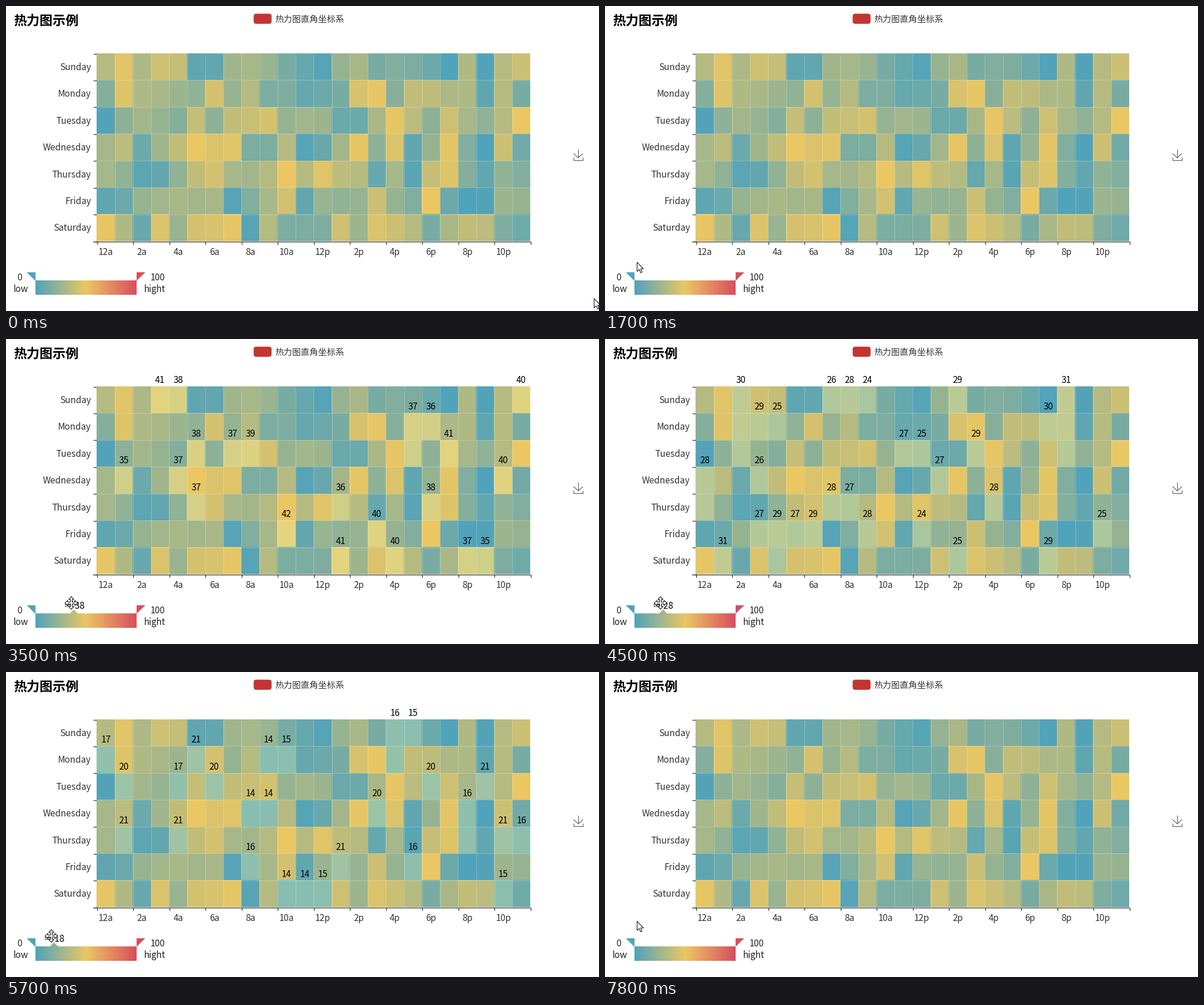
A matplotlib script for the animation above (8000 ms loop, 1026x528 px).

```python
import numpy as np
import matplotlib
matplotlib.rcParams["toolbar"] = "None"
import matplotlib.pyplot as plt
from matplotlib.animation import FuncAnimation
from matplotlib.patches import FancyBboxPatch, Polygon

W, H, DPI, STEP, FRAMES = 1026, 528, 100, 100, 80
PT = 72 / DPI
FONT = "Noto Sans CJK JP"
DARK = "#333333"
RAMP = np.array([(80, 163, 186), (234, 199, 99), (217, 78, 93)], float)

# One value per hour
sunday = [33, 47, 30, 41, 38, 5, 6, 26, 28, 24, 13, 7,
          2, 23, 29, 13, 16, 15, 9, 0, 31, 1, 33, 40]
monday = [17, 46, 31, 29, 25, 21, 43, 23, 33, 14, 15, 7,
          9, 13, 44, 49, 18, 37, 36, 30, 31, 5, 33, 13]
tuesday = [1, 20, 27, 23, 17, 38, 20, 37, 39, 43, 23, 27,
           25, 9, 9, 29, 49, 35, 20, 41, 28, 21, 33, 50]
wednesday = [28, 35, 9, 26, 37, 50, 45, 47, 14, 14, 33, 2,
             8, 27, 49, 20, 45, 5, 23, 48, 16, 0, 40, 11]
thursday = [28, 21, 4, 6, 21, 37, 43, 28, 27, 33, 50, 33,
            47, 36, 33, 7, 28, 3, 38, 46, 17, 6, 21, 16]
friday = [5, 9, 23, 27, 29, 27, 29, 2, 16, 28, 42, 6,
          24, 21, 23, 40, 23, 16, 50, 9, 0, 1, 25, 23]
saturday = [49, 31, 8, 45, 24, 43, 44, 49, 2, 33, 14, 14,
            15, 41, 25, 45, 40, 33, 13, 29, 37, 35, 15, 10]
DAYS = ["Sunday", "Monday", "Tuesday", "Wednesday", "Thursday", "Friday", "Saturday"]
values = np.array([sunday, monday, tuesday, wednesday, thursday, friday, saturday])

LEFT, TOP, RIGHT, BOTTOM = 157.3, 82, 907.3, 407
CW, CH = (RIGHT - LEFT) / 24, (BOTTOM - TOP) / 7
BAR_X, BAR_W, BAR_Y, BAR_H = 51, 175, 475.5, 25
REACH = 600 / 140

# Pointer path: time in ms, x, y
PATH = np.array([
    (800, 122, 516), (1000, 110, 494), (1200, 85, 482), (1400, 62, 472),
    (1600, 56, 452), (1700, 55, 443), (1800, 56, 455), (1900, 58, 466),
    (2200, 86, 482), (2500, 130, 489), (2600, 128, 474), (2700, 126, 457),
    (3300, 126, 457), (3400, 120, 457), (3500, 113, 457), (3700, 109, 457),
    (4000, 109, 457), (4500, 96, 457), (4800, 89, 457), (5000, 89, 457),
    (5300, 84, 457), (5400, 84, 457), (5700, 78.5, 457), (6000, 69, 457),
    (6300, 69, 457), (6400, 66, 457), (6500, 66, 457), (6600, 64, 455),
    (6700, 62, 443), (7100, 43, 431), (7400, 43, 431), (7800, 55, 431)])


def ramp(v):
    """Colour of a value on the 0-100 scale."""
    v = np.clip(np.asarray(v, float), 0, 100)
    return np.stack([np.interp(v, (0, 50, 100), RAMP[:, i]) for i in range(3)], -1) / 255


fig = plt.figure(figsize=(W / DPI, H / DPI), dpi=DPI, facecolor="white")
ax = fig.add_axes([0, 0, 1, 1])
ax.set_xlim(0, W)
ax.set_ylim(H, 0)
ax.axis("off")


def label(x, y, s, size=15.4, ha="center", color=DARK, **kw):
    return ax.text(x, y, s, fontsize=size * PT, ha=ha, va="baseline",
                   color=color, family=FONT, **kw)


def line(xs, ys, color=DARK, width=1.25, **kw):
    ax.plot(xs, ys, color=color, lw=width * PT, **kw)


def shape(points, fill, edge="none", z=3):
    return ax.add_patch(Polygon(points, fc=fill, ec=edge, lw=PT, zorder=z))


def image(data, box):
    x0, y0, x1, y1 = box
    return ax.imshow(data, extent=(x0, x1, y1, y0), aspect="auto",
                     interpolation="nearest", zorder=2)


# Title, legend, download button
label(13, 33, "热力图示例", 22.5, "left", "black", weight="bold")
ax.add_patch(FancyBboxPatch((428.5, 13.3), 31, 17.5, fc="#c23531", ec="none",
                            boxstyle="round,pad=0,rounding_size=4.4"))
label(465.5, 28, "热力图直角坐标系", 15, "left")
grey = dict(color="#666666", solid_capstyle="butt", solid_joinstyle="miter")
line([982, 990, 998.2], [255.4, 262.7, 255.6], **grey)
line([982, 982, 998, 998], [262, 266.6, 266.6, 262], **grey)
line([990, 990], [248, 262.5], **grey)

# Axes
line([157, 157], [TOP, 407.5], zorder=1, solid_capstyle="butt")
line([151, RIGHT], [407.5, 407.5], zorder=4)
for i in range(8):
    y = TOP + i * CH + 0.5
    line([151, 157], [y, y], zorder=1, solid_capstyle="butt")
for i in range(13):
    x = LEFT + i * 2 * CW + 0.2
    line([x, x], [407.5, 413], solid_capstyle="butt")
for i, name in enumerate(DAYS):
    label(147, TOP + (i + 0.5) * CH + 5.6, name, ha="right")
for h in range(0, 24, 2):
    label(LEFT + (h + 0.5) * CW, 431, f"{h % 12 or 12}{'ap'[h // 12]}")

# Heat map
base = ramp(values)
lifted = np.minimum(base * 1.1, 1)
cells = image(base, (LEFT, TOP, RIGHT, BOTTOM))
for c in range(1, 24):
    x = LEFT + c * CW
    line([x, x], [TOP, BOTTOM], "white", 1, alpha=0.25, zorder=3)
for r in range(1, 7):
    y = TOP + r * CH
    line([LEFT, RIGHT], [y, y], "white", 1, alpha=0.25, zorder=3)
numbers = [[label(LEFT + (c + 0.5) * CW, TOP + r * CH - 6, str(values[r, c]),
                  color="black", zorder=5, visible=False)
            for c in range(24)] for r in range(7)]

# Colour scale
image(ramp(np.linspace(0, 100, BAR_W))[None], (BAR_X, BAR_Y, BAR_X + BAR_W, BAR_Y + BAR_H))
shape([(36, 461), (51, 461), (51, 475.5)], ramp(0))
shape([(226, 461), (241, 461), (226, 475.5)], ramp(100))
for x, y, s in ((24, 475, "0"), (26, 495, "low"), (262, 475, "100"), (257.5, 495, "hight")):
    label(x, y, s, color="#222222")
marker = shape([(0, 0), (1, 0), (0, 1)], "white", z=5)
readout = label(0, 467, "", color="black", zorder=6)

# Pointers
ARROW = np.array([(0.5, 0.5), (0.5, 16.5), (4.2, 13), (6.8, 18.8), (9.2, 17.7),
                  (6.7, 12), (11.5, 12)])
quarter = np.array([(1.5, -1.5), (1.5, -6), (4.5, -6), (0, -11), (-4.5, -6), (-1.5, -6)])
MOVE = np.vstack([quarter @ np.array([[np.cos(a), np.sin(a)], [-np.sin(a), np.cos(a)]])
                  for a in -np.arange(4) * np.pi / 2])
pointer = shape(ARROW, "white", "black", z=8)


def hovering(t):
    return 1000 <= t <= 1500 or 1900 <= t <= 6800


def draw(n):
    t = n * STEP
    if t < 100:
        x, y = 1017, 506
    else:
        x, y = (np.interp(t, PATH[:, 0], PATH[:, i]) for i in (1, 2))
    on = hovering(t)
    move = on and t < 6700
    pointer.set_visible(t < 100 or t >= 800)
    pointer.set_xy((MOVE if move else ARROW) + (x, y))

    tip = x + (4.5 if move else 3)
    v = (tip - BAR_X) / BAR_W * 100
    hot = (np.abs(values - v) <= REACH) & on
    cells.set_data(np.where(hot[..., None], lifted, base))
    for r in range(7):
        for c in range(24):
            # a lit cell covers the number of the cell below it
            numbers[r][c].set_visible(hot[r, c] and not (r and hot[r - 1, c]))

    marker.set_visible(on)
    readout.set_visible(on)
    marker.set_xy([(tip, 468), (tip + 7.5, 475.7), (tip - 7.5, 475.7)])
    marker.set_facecolor(ramp(v))
    readout.set_x(tip)
    readout.set_text(f"≈ {v:.0f}")
    return []


anim = FuncAnimation(fig, draw, frames=FRAMES, interval=STEP, repeat=True,
                     repeat_delay=0, blit=False)
plt.show()
```
